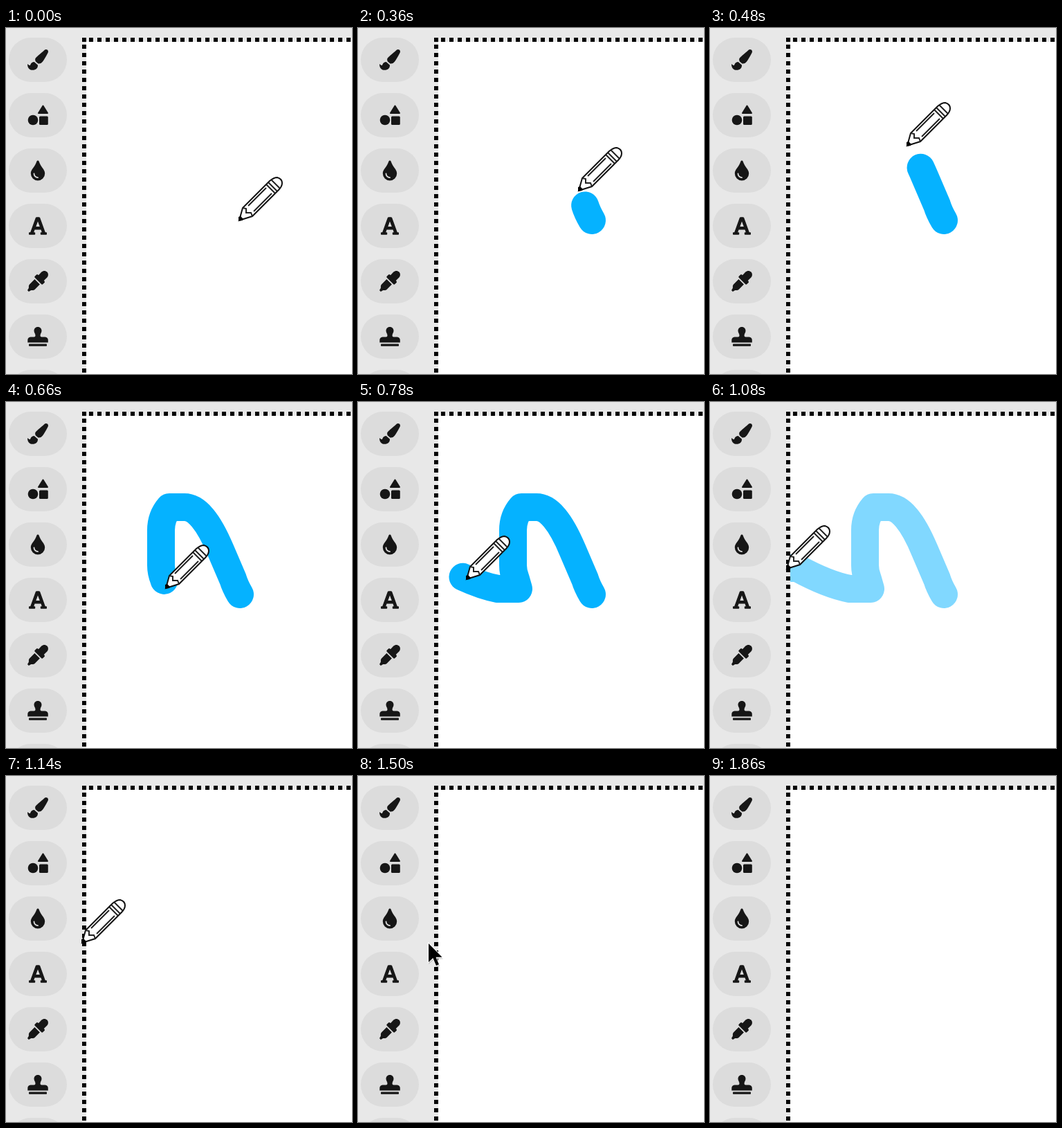
An HTML page that plays this animation: 500x500 px, repeating every 1980 ms.

```html
<!DOCTYPE html>
<html lang="en">
<head>
<meta charset="utf-8">
<title>Drawing tools</title>
<style>
  html, body { margin: 0; width: 100%; height: 100%; overflow: hidden; background: #e8e8e8; }
  svg { display: block; width: 100%; height: 100%; }
  .icon { fill: #161616; }
  .edge { stroke: #000; stroke-width: 6; stroke-dasharray: 6; shape-rendering: crispEdges; }
  .ink { fill: none; stroke: #05b2ff; stroke-width: 40; stroke-linecap: round; stroke-linejoin: round; }
  .wood { fill: #fff; stroke: #111; stroke-width: 2; }
  .grain { fill: none; stroke: #222; stroke-width: 2; }
</style>
</head>
<body>
<svg viewBox="0 0 500 500">
  <defs>
    <clipPath id="paper"><path d="M116 20H500V500H116z"/></clipPath>
  </defs>
  <rect width="500" height="500" fill="#e8e8e8"/>
  <g id="buttons" fill="#dcdcdc"></g>

  <g class="icon">
    <!-- brush -->
    <path d="M57.800 31C57 31 56.100 31.400 55.500 32C43.500 42.700 42.200 42.900 42.200 46.100Q42.200 47.200 42.700 48.300L46.500 51.400Q47.200 51.600 47.800 51.600C51.400 51.600 53.600 49 60.200 36.600Q61 35 61 33.900C61 32.200 59.500 31 57.800 31z"/>
    <path d="M40.800 49.100C38.400 49.300 36.300 50.200 35.100 53.400Q34.800 54 34.200 54C33.600 54 31.600 52.300 31 51.900C31 56.700 33.200 60.800 38.500 60.800C43 60.800 46 58.400 46 54L45.900 53.400z"/>
    <!-- shapes -->
    <path d="M53.500 112.500L60 123H47z" stroke="#161616" stroke-width="2" stroke-linejoin="round"/>
    <circle cx="39" cy="133" r="7.300"/>
    <rect x="48" y="127.500" width="12.800" height="12.500" rx="1.500"/>
    <!-- drop -->
    <path d="M47.500 192.500C47 191 45 191 44.500 192.500C41.600 201.500 35.800 204 35.800 210.300A10.200 10.200 0 0 0 56.200 210.300C56.200 204 50.400 201.500 47.500 192.500z"/>
    <path d="M40.500 210.500A5.600 5.600 0 0 0 46 216.200" fill="none" stroke="#dcdcdc" stroke-width="1.800" stroke-linecap="round"/>
    <!-- letter -->
    <path fill-rule="evenodd" d="M58.200 295.200H56.800L49.200 274.300Q48.700 273.200 47.400 273.200H44.600Q43.300 273.200 42.800 274.300L35.200 295.200H33.800Q33 295.200 33 296V298Q33 298.800 33.800 298.800H41.300Q42.200 298.800 42.200 298V296Q42.200 295.200 41.300 295.200H40.200L41.500 291.500H50.500L51.800 295.200H50.700Q49.800 295.200 49.800 296V298Q49.800 298.800 50.700 298.800H58.200Q59 298.800 59 298V296Q59 295.200 58.200 295.200zM43.300 286.900L46 279.400L48.800 286.900z"/>
    <!-- dropper -->
    <path d="M34 370.500C33.300 371.200 32.900 372.200 32.900 373.200V375.800L31 379.100L32.900 381L36.200 379.100H38.800Q40.400 379.100 41.500 378L48.900 370.600L41.400 363.100z"/>
    <path d="M59.400 352.600C57.200 350.500 53.600 350.500 51.400 352.600L46.900 357.200L46.100 356.400Q45.100 355.600 44.100 356.400L41.700 358.800Q40.800 359.800 41.700 360.800L51.200 370.300Q52.200 371.100 53.200 370.300L55.600 367.900Q56.400 366.900 55.600 365.900L54.800 365.100L59.400 360.600C61.500 358.400 61.500 354.800 59.400 352.600z"/>
    <!-- stamp -->
    <path d="M46 432C49.500 432 51.500 434.500 51.500 437.500C51.500 440.500 49.500 441.500 49.500 444.500Q49.500 446.500 51.500 446.500H56.500Q60.800 447 60.800 451V454.500H31.300V451Q31.300 447 35.500 446.500H40.500Q42.500 446.500 42.500 444.500C42.500 441.500 40.500 440.500 40.500 437.500C40.500 434.500 42.500 432 46 432z"/>
    <rect x="33" y="456.500" width="26" height="3.300" rx=".8"/>
  </g>

  <path d="M116 20H500V500H116z" fill="#fff"/>
  <g class="edge">
    <path d="M110 17H116M120 17H500"/>
    <path d="M113 24V500"/>
  </g>

  <g clip-path="url(#paper)">
    <path id="ink" class="ink" d="M338 278Q331 266 328 256L310 214Q284 152 258 152H236Q224 166 224 185V236Q224 246 228 256L232 270H202Q170 264 126 240H108"/>
  </g>

  <!-- both pointers have their tip at 0,0 -->
  <g id="pencil">
    <path class="wood" d="M1 -1L6 -19L45 -58Q51 -63 56 -63Q63 -61 63 -55Q63 -50 58 -45L20 -7z"/>
    <path class="grain" d="M6 -19L11 -18V-12L18 -12L20 -7M14 -22L40 -48M22 -14L48 -40M40 -53L53 -40M43 -56L56 -43M47 -60L60 -47"/>
    <path d="M0 0V-6L3 -7L7 -3L6 -1z"/>
  </g>
  <g id="arrow">
    <path d="M1 2V31L7.500 25L12 36L17.500 33.500L13 23.500H22z" opacity=".18"/>
    <path d="M1 1V28L7.300 22L12 33L16 31.300L11.500 20.700H20.500z" stroke="#fff" stroke-width="2" paint-order="stroke"/>
  </g>
</svg>
<script>
  const LOOP = 1980, STEP = 60;
  const FADE = 1080, CLEAR = 1140, SWAP = 1200, DROP = 1440, GONE = 1860;
  const [buttons, ink, pencil, arrow] =
    ["buttons", "ink", "pencil", "arrow"].map(id => document.getElementById(id));
  const inkLength = ink.getTotalLength();

  buttons.innerHTML = Array.from({ length: 7 }, (_, i) =>
    `<rect x="4" y="${14 + i * 80}" width="84" height="64" rx="32"/>`).join("");

  // distance along the stroke: slow start, fast middle, slow end
  const travel = (t, middle, spread) => inkLength / (1 + Math.exp((middle - t) / spread));

  function show(el, visible, x, y) {
    el.style.display = visible ? "" : "none";
    el.setAttribute("transform", `translate(${Math.round(x)} ${Math.round(y)})`);
  }

  const start = performance.now();
  function draw() {
    const now = (performance.now() - start) % LOOP;
    const t = Math.floor(now / STEP) * STEP;

    const pen = ink.getPointAtLength(travel(t, 576, 104));
    show(pencil, t < SWAP, pen.x - 1, pen.y + 2);

    // the ink trails the pencil and catches up at the end
    ink.style.display = t >= 120 && t < CLEAR ? "" : "none";
    ink.style.opacity = t < FADE ? 1 : 0.5;
    ink.style.strokeDasharray = `${travel(t, 601, 85)} ${2 * inkLength}`;

    const fall = Math.max(0, (t - DROP) / (GONE - DROP));
    show(arrow, t >= SWAP && t < GONE, 101 + 3 * fall, 240 + 270 * fall ** 3);

    requestAnimationFrame(draw);
  }
  draw();
</script>
</body>
</html>
```
